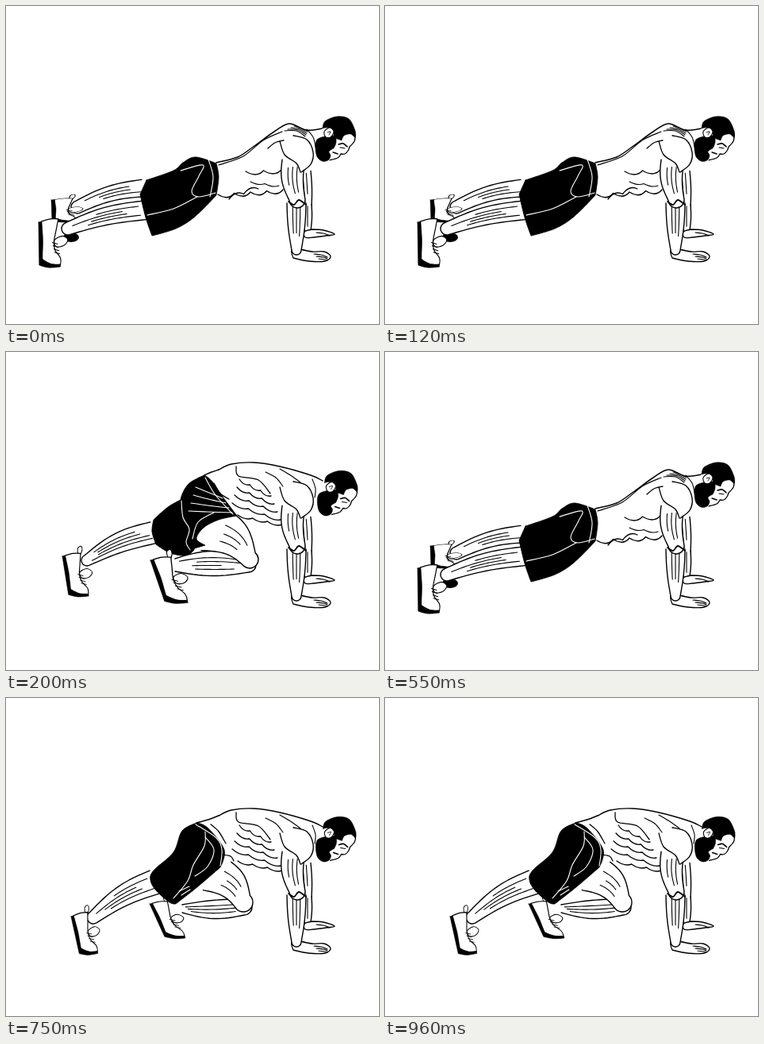
These frames come from a looping animation (470x400 px, 1.1 s). An HTML page with a canvas:

```html
<!DOCTYPE html>
<html lang="en">
<head>
<meta charset="utf-8">
<title>Mountain climber</title>
<style>
html, body { margin: 0; width: 100%; height: 100%; overflow: hidden; background: #fff; }
canvas { display: block; }
</style>
</head>
<body>
<canvas id="stage" width="470" height="400"></canvas>
<script>
const ctx = document.getElementById('stage').getContext('2d');
const BLACK = '#000', WHITE = '#fff';
ctx.lineCap = ctx.lineJoin = 'round';

const mix = (a, b, t) => a + (b - a) * t;

function randomizer(seed) {
  return () => (seed = (seed * 16807) % 2147483647) / 2147483647;
}

// Smooth curve through "x,y" points; a trailing "!" makes a sharp corner.
function trace(text, closed) {
  const pts = text.split(' ').map(s => {
    const [x, y] = s.replace('!', '').split(',').map(Number);
    return { x, y, sharp: s.endsWith('!') };
  });
  const n = pts.length;
  const at = i => closed ? pts[(i + n) % n] : pts[Math.max(0, Math.min(n - 1, i))];
  const slope = i => {
    const a = at(i - 1), b = at(i + 1), k = at(i).sharp ? 0 : 1 / 6;
    return [(b.x - a.x) * k, (b.y - a.y) * k];
  };
  ctx.moveTo(pts[0].x, pts[0].y);
  for (let i = 0; i < (closed ? n : n - 1); i++) {
    const p = at(i), q = at(i + 1), s = slope(i), t = slope(i + 1);
    ctx.bezierCurveTo(p.x + s[0], p.y + s[1], q.x - t[0], q.y - t[1], q.x, q.y);
  }
  if (closed) ctx.closePath();
}

function stroke(width, color = BLACK) {
  ctx.lineWidth = width;
  ctx.strokeStyle = color;
  ctx.stroke();
}

function ink(text, width = 1.3, color = BLACK) {
  ctx.beginPath();
  trace(text, false);
  stroke(width, color);
}

function blob(text, fill = WHITE, width = 1.3) {
  ctx.beginPath();
  trace(text, true);
  ctx.fillStyle = fill;
  ctx.fill();
  if (width) stroke(width);
}

const seam = text => ink(text, 1.1, WHITE);

// Tapered limb from one joint to the next, with muscle strands along it.
function limb([x0, y0, r0], [x1, y1, r1], bend, bulge, strands) {
  const len = Math.hypot(x1 - x0, y1 - y0);
  const nx = (y0 - y1) / len, ny = (x1 - x0) / len;
  const point = (t, side) => {
    const arc = Math.sin(Math.PI * t);
    const off = bend * arc + side * (mix(r0, r1, t) + bulge * arc);
    return [mix(x0, x1, t) + nx * off, mix(y0, y1, t) + ny * off];
  };
  const run = (from, to, side) => {
    for (let i = 0; i <= 16; i++) ctx.lineTo(...point(mix(from, to, i / 16), side));
  };
  ctx.beginPath();
  run(0, 1, 1);
  const turn = Math.atan2(ny, nx);
  ctx.arc(x1, y1, r1, turn, turn - Math.PI, true);
  run(1, 0, -1);
  ctx.fillStyle = WHITE;
  ctx.fill();
  stroke(1.4);

  const rnd = randomizer(Math.round(len * 37 + x0));
  for (let k = 1; k <= strands; k++) {
    const side = mix(-.8, .8, k / (strands + 1));
    ctx.beginPath();
    run(.05 + .25 * rnd(), .6 + .35 * rnd(), side);
    stroke(1.1);
  }
}

// A row of n muscle bumps from one point to another.
function scallops(x0, y0, x1, y1, n, depth, width = 1.3) {
  const len = Math.hypot(x1 - x0, y1 - y0);
  ctx.beginPath();
  ctx.moveTo(x0, y0);
  for (let i = 0; i < n; i++) {
    const m = (i + .6) / n, e = (i + 1) / n;
    ctx.quadraticCurveTo(
      mix(x0, x1, m) - (y1 - y0) / len * depth, mix(y0, y1, m) + (x1 - x0) / len * depth,
      mix(x0, x1, e), mix(y0, y1, e));
  }
  stroke(width);
}

function head(dx, dy) {
  ctx.save();
  ctx.translate(dx, dy);
  blob('400,152 425,148 440,162 437,174 427,186! 416,190 402,193 392,180', WHITE, 0);
  ink('440,162 439,170 433,177! 431,182 427,186 422,186! 418,191 408,194');
  blob('399,154! 402,145 417,139 432,142 440,157 440,166! 434,161 426,163 423,169! 414,165 412,155 404,153', BLACK, .5);
  blob('392,168 413,163 416,171 413,179! 407,183 409,188 406,194 398,195 391,187', BLACK, .5);
  blob('401,158 408,153 413,158 409,165 403,165', WHITE, 1.1);
  ink('405,159 409,158 407,162', .9);
  ink('419,174 425,173 430,177', 1.6);
  ink('421,178 427,179', 1.1);
  ink('412,184 418,186', 1.5);
  ctx.restore();
}

function fingers(x, y, n) {
  for (let i = 0; i < n; i++) ink(`${x + 3 * i},${y + 3 * i} ${x + 9 + 3 * i},${y + 1 + 3 * i} ${x + 17},${y + 4 + 2 * i}`, 1.1);
}

function farArm() {
  limb([376, 208, 8], [379, 252, 6], 0, 1, 2);
  limb([380, 250, 5], [380, 282, 4], 0, 1, 1);
  blob('376,284 386,281! 400,282 414,287 403,289 387,291 377,291');
  fingers(391, 285, 1);
}

function nearArm() {
  blob('360,307 371,306! 386,309 401,309 409,315 402,321 382,321 362,317!');
  fingers(388, 312, 3);
  limb([366, 248, 12], [366, 307, 6], 0, 1.5, 3);
  limb([363, 192, 15], [367, 244, 10], 4, 1, 3);
  ink('356,246 363,250 369,244 378,250', 1.8);
  blob('349,172 364,164 379,168 387,184 383,200 372,208 365,199 351,192', WHITE, 0);
  ink('345,170 351,187 366,198 371,209');
  ink('362,163 379,168 387,184 384,199 372,209', 1.4);
}

// Upright trainer in its own 30 by 56 box, slanted by the axes u and v.
function shoe(x, y, [ux, uy], [vx, vy], tab = true) {
  ctx.save();
  ctx.transform(ux, uy, vx, vy, x, y);
  if (tab) blob('23,-3! 24,-11 29,-14 30,-9 27,-3!', WHITE, 1.1);
  blob('22,22 33,17 40,22 34,29 24,30', WHITE, 1.1);
  blob('4,-1! 16,-4 27,-4! 24,10 21,25 23,35 30,44 30,52! 18,52 5,46!');
  blob('0,0! 4,-1! 6,22 5,45! 14,51 30,52! 30,55! 14,56 1,53!', BLACK, .6);
  for (let i = 0; i < 4; i++) ink(`${19 + i},${25 + 4 * i} ${26 + i},${27 + 4 * i}`, 1);
  ctx.restore();
}

function plank() {
  farArm();
  limb([174, 229, 11], [90, 253, 8], 5, 0, 3);
  shoe(57, 244, [1, 0], [0, .5]);
  ctx.beginPath();
  ctx.ellipse(82, 291, 10, 6, 0, 0, 7);
  ctx.fillStyle = BLACK;
  ctx.fill();
  limb([174, 257, 12], [78, 280, 8], 4, 1, 4);
  shoe(41, 272, [.92, 0], [0, 1.02], false);

  ink('399,154 378,156 357,148 338,158 313,176 292,190 265,197', 1.5);
  ink('348,158 324,169 299,189 268,200', 1.1);
  for (let i = 0; i < 4; i++) ink(`${351 + 4 * i},${157 - 2 * i} ${366 + 2 * i},${157 - i} ${377 + i},${164 - 2 * i}`, 1.1);
  ink('379,155 387,165 390,177', 1.1);
  ink('330,179 339,172 350,169');
  scallops(267, 237, 349, 231, 4, 9, 1.4);
  scallops(281, 243, 318, 230, 2, -8);
  scallops(302, 208, 347, 206, 2, 9);
  scallops(308, 221, 344, 226, 2, 4, 1.1);

  blob('177,219! 211,207 223,197 239,190 265,198! 268,215 265,238! 238,265 214,280 184,289! 176,266 169,237!', BLACK, .8);
  seam('255,193 261,215 257,240');
  seam('220,207 248,200 243,214 234,233 243,240 264,235');
  seam('241,240 211,255 178,263');
  nearArm();
  head(0, 0);
}

function climberTorso() {
  farArm();
  ink('268,148 284,141 312,139 345,144 384,155 399,162', 1.4);
  ink('290,144 293,156 318,161 333,178');
  ink('327,151 340,158 349,169', 1.1);
  ink('345,147 360,156 371,164', 1.1);
  for (let i = 0; i < 4; i++) scallops(294 - 3 * i, 160 + 10 * i, 334 + 4 * i, 181 + 10 * i, 3, 5);
  scallops(292, 205, 348, 217, 3, 5, 1.4);
  ink('386,160 390,172 389,183', 1.1);
}

function climbA() {
  climberTorso();
  ink('250,155 259,151 268,148', 1.4);
  ink('262,165 270,178 281,185');
  limb([187, 227, 14], [102, 262, 7], 5, 2, 4);
  shoe(71, 257, [.87, 0], [.13, .91]);
  blob('222,185! 204,195 186,211! 184,226 189,242! 207,253 227,256 237,249! 240,205', BLACK, .8);
  limb([213, 268, 8], [306, 268, 9], -2, 7, 4);
  limb([266, 226, 31], [307, 261, 11], -7, 0, 3);
  shoe(182, 262, [1, 0], [.315, .97]);
  blob('250,155! 230,166 220,186 223,208 230,224 226,239 231,249! 251,243! 240,235 249,221 268,211 291,206! 273,182 259,162', BLACK, .8);
  seam('221,187 223,208 231,223 227,239 232,249');
  seam('251,158 264,180 286,204');
  for (let i = 0; i < 4; i++) seam(`${239 - 3 * i},${170 + 10 * i} ${256 - i},${177 + 8 * i} ${273 + 4 * i},${184 + 6 * i}`);
  seam('235,235 242,214 262,202');
  nearArm();
  head(2.5, 10.5);
}

function climbB() {
  climberTorso();
  ink('240,157 255,153 268,148', 1.4);
  ink('258,159 268,168 277,183');
  limb([222, 265, 5], [300, 263, 10], 2, 4, 3);
  limb([266, 224, 25], [299, 257, 12], -6, 0, 3);
  shoe(181, 259, [.88, 0], [.34, .78]);
  limb([189, 231, 16], [110, 276, 8], 5, 1, 4);
  shoe(82, 275, [.8, -.07], [.18, .88]);
  blob('241,157! 222,167 211,194 186,217 182,229 189,242 206,257 214,259! 242,237 270,213! 275,191 255,164', BLACK, .8);
  seam('239,159 265,176 272,191 270,211');
  seam('251,168 250,186 236,210 229,230 211,252');
  seam('251,175 262,191 254,212 238,224');
  for (let i = 0; i < 2; i++) seam(`${218 + 3 * i},${243 + 5 * i} ${231 + i},${237 + 4 * i}`);
  ink('273,197 283,199 287,205');
  nearArm();
  head(.5, 10.5);
}

const LOOP = 1100;
const steps = [[200, plank], [550, climbA], [750, plank], [LOOP, climbB]];
const start = performance.now();
let shown = null;

function tick() {
  const t = (performance.now() - start) % LOOP;
  const pose = steps.find(([end]) => t < end)[1];
  if (pose !== shown) {
    ctx.fillStyle = WHITE;
    ctx.fillRect(0, 0, 470, 400);
    pose();
    shown = pose;
  }
  requestAnimationFrame(tick);
}
tick();
</script>
</body>
</html>
```
